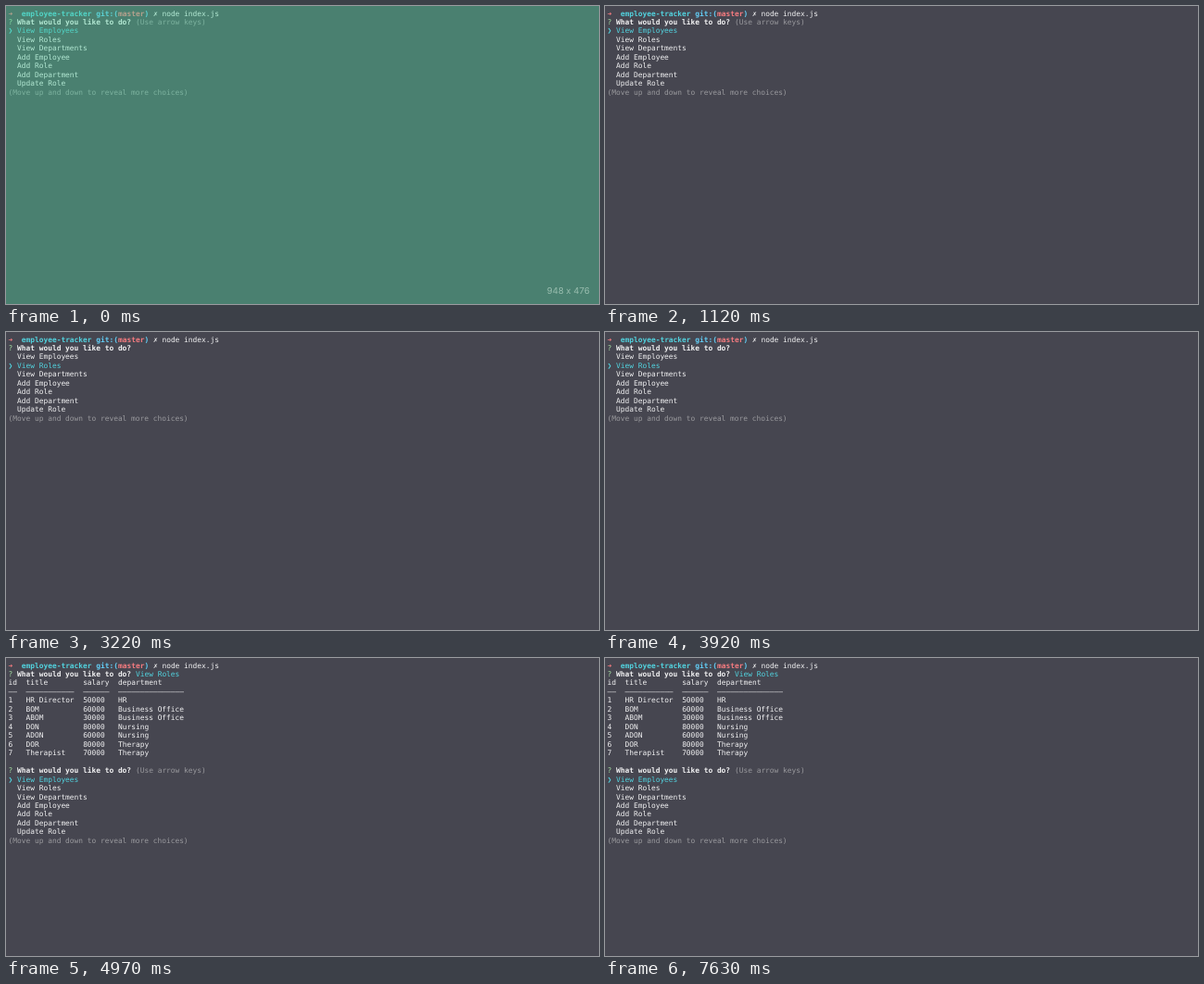
An HTML page for the animation above (8120 ms loop, 640 px wide and 322 px high).

```html
<!DOCTYPE html>
<html lang="en">
<head>
<meta charset="utf-8">
<title>Terminal menu</title>
<style>
  html, body { margin: 0; width: 100%; height: 100%; overflow: hidden; background: #464650; }
  svg { display: block; width: 640px; height: 322px; }
  text { white-space: pre; text-rendering: geometricPrecision; }
  #term { font: 7.87px "DejaVu Sans Mono", "Noto Sans Mono", monospace; }
  #size { font: 9.6px Inter, "Liberation Sans", sans-serif; }
</style>
</head>
<body>
<svg viewBox="0 0 640 322">
  <rect width="640" height="322" fill="#464650"/>
  <g id="term"></g>
  <g id="capture">
    <rect width="640" height="322" fill="#50d7a0" opacity=".4"/>
    <text id="size" x="630" y="311" text-anchor="end" fill="#98bcae">948 x 476</text>
  </g>
</svg>
<script>
const LOOP = 8120, CAPTURE_END = 70, MOVE_AT = 3010, ENTER_AT = 4060;
const LEFT = 2.6, TOP = 10.5, COL = 4.738, ROW = 9.47;
const WHITE = "#f2f2f3", CYAN = "#52d3df", BLUE = "#62cdf5", RED = "#f77c80",
      GREEN = "#a5dfa2", GRAY = "#99999d";

const choices = ["View Employees", "View Roles", "View Departments", "Add Employee",
                 "Add Role", "Add Department", "Update Role"];
const roles = [
  ["HR Director", 50000, "HR"],
  ["BOM", 60000, "Business Office"],
  ["ABOM", 30000, "Business Office"],
  ["DON", 80000, "Nursing"],
  ["ADON", 60000, "Nursing"],
  ["DOR", 80000, "Therapy"],
  ["Therapist", 70000, "Therapy"]
];
const tableCols = [0, 4, 17, 25], tableWidths = [2, 11, 6, 15];

const term = document.getElementById("term");
const capture = document.getElementById("capture");

function put(row, col, str, fill = WHITE, bold = false) {
  const t = document.createElementNS("http://www.w3.org/2000/svg", "text");
  t.setAttribute("x", LEFT + col * COL);
  t.setAttribute("y", TOP + row * ROW);
  t.setAttribute("fill", fill);
  if (bold) t.setAttribute("font-weight", "bold");
  t.textContent = str;
  term.appendChild(t);
}

function shellLine() {
  put(0, 0, "➜", RED, true);
  put(0, 3, "employee-tracker", CYAN, true);
  put(0, 20, "git:(", BLUE, true);
  put(0, 25, "master", RED, true);
  put(0, 31, ")", BLUE, true);
  put(0, 33, "✗", WHITE, true);
  put(0, 35, "node index.js");
}

function question(row, tail, fill) {
  put(row, 0, "?", GREEN);
  put(row, 2, "What would you like to do?", WHITE, true);
  put(row, 29, tail, fill);
}

function menu(row, active, hint) {
  question(row, hint ? "(Use arrow keys)" : "", GRAY);
  choices.forEach((label, i) => {
    const on = i === active, y = row + 1 + i;
    if (on) put(y, 0, "❯", CYAN);
    put(y, 2, label, on ? CYAN : WHITE);
  });
  put(row + 8, 0, "(Move up and down to reveal more choices)", GRAY);
}

function table(row) {
  const line = (y, cells) => cells.forEach((c, i) => put(y, tableCols[i], c));
  line(row, ["id", "title", "salary", "department"]);
  line(row + 1, tableWidths.map(n => "–".repeat(n)));
  roles.forEach((r, i) => line(row + 2 + i, [i + 1, ...r]));
}

const scenes = [
  () => menu(1, 0, true),
  () => menu(1, 1, false),
  () => {
    question(1, "View Roles", CYAN);
    table(2);
    menu(12, 0, true);
  }
];

let shown = -1;
function draw(time) {
  const t = time % LOOP;
  const scene = t < MOVE_AT ? 0 : t < ENTER_AT ? 1 : 2;
  if (scene !== shown) {
    term.replaceChildren();
    shellLine();
    scenes[scene]();
    shown = scene;
  }
  capture.setAttribute("visibility", t < CAPTURE_END ? "visible" : "hidden");
}

const start = performance.now();
function tick(now) {
  draw(Math.max(0, now - start));
  requestAnimationFrame(tick);
}
draw(0);
requestAnimationFrame(tick);
</script>
</body>
</html>
```
